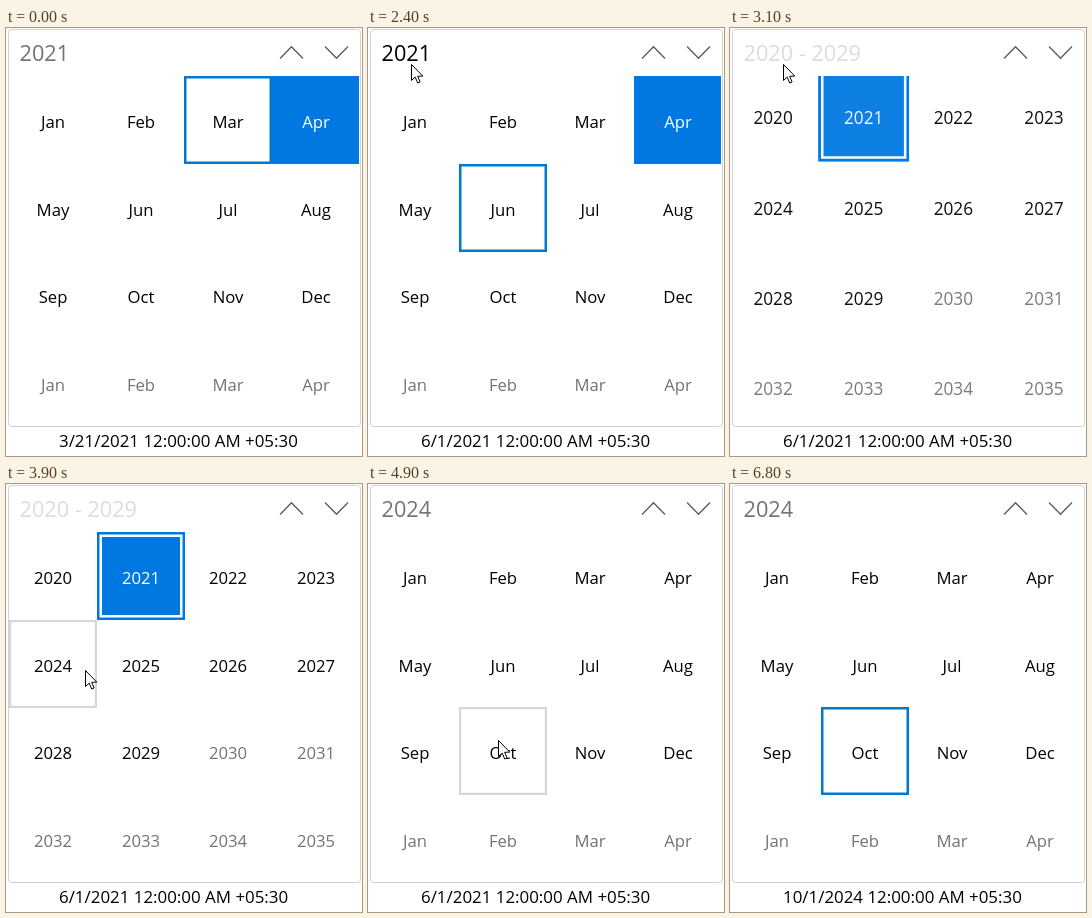
An HTML page with a canvas that plays this animation: 356 px wide and 428 px high, repeating every 6900 ms.

```html
<!DOCTYPE html>
<html lang="en">
<head>
<meta charset="utf-8">
<title>Calendar picker</title>
<style>
  html, body { margin: 0; width: 100%; height: 100%; overflow: hidden; background: #fff; }
  canvas { display: block; }
</style>
</head>
<body>
<canvas id="stage" width="356" height="428"></canvas>
<script>
const ctx = document.getElementById("stage").getContext("2d");
const LOOP = 6900, STEP = 100, CELL = 87.5, LEFT = 3, TOP = 48;
const BLUE = "#0078e2", EDGE = "#0078d0", GRAY = "#737373";
const FONT = '"Open Sans", "Noto Sans", sans-serif';
const MONTHS = "Jan Feb Mar Apr May Jun Jul Aug Sep Oct Nov Dec Jan Feb Mar Apr".split(" ");
const YEARS = Array.from({ length: 16 }, (_, i) => String(2020 + i));

// Pointer path: time, x, y
const PATH = [
  [600, 225, 210], [1100, 149, 177], [1500, 149, 177], [1800, 115, 112],
  [2100, 62, 76], [2300, 44, 40], [2400, 43, 36], [2900, 43, 36],
  [3100, 53, 36], [3300, 53, 36], [3800, 79, 186], [4300, 79, 186],
  [4800, 130, 256], [5800, 130, 256], [6500, 170, 400]
];

const clamp = v => Math.max(0, Math.min(1, v));

function pointer(t) {
  const i = PATH.findIndex(k => k[0] > t);
  if (i < 1) return null;
  const [t0, x0, y0] = PATH[i - 1], [t1, x1, y1] = PATH[i];
  const p = (t - t0) / (t1 - t0), e = p * p * (3 - 2 * p);
  return { x: x0 + (x1 - x0) * e, y: y0 + (y1 - y0) * e };
}

function cellAt(pos) {
  if (!pos) return -1;
  const c = Math.floor((pos.x - LEFT) / CELL), r = Math.floor((pos.y - TOP) / CELL);
  return c >= 0 && c < 4 && r >= 0 && r < 4 ? r * 4 + c : -1;
}

function text(s, x, y, size, color, align = "left") {
  ctx.font = `${size}px ${FONT}`;
  ctx.fillStyle = color;
  ctx.textAlign = align;
  ctx.fillText(s, x, y);
}

function line(points, color, width) {
  ctx.beginPath();
  points.forEach(p => ctx.lineTo(...p));
  ctx.strokeStyle = color;
  ctx.lineWidth = width;
  ctx.stroke();
}

function box(x, y, inset, color, width) {
  const d = inset + width / 2, size = 88 - 2 * d;
  ctx.strokeStyle = color;
  ctx.lineWidth = width;
  ctx.strokeRect(x + d, y + d, size, size);
}

// view: labels, count of active cells, today's cell, selected cell
function grid(view, hover, scale = 1, alpha = 1) {
  if (alpha <= 0) return;
  ctx.save();
  ctx.beginPath();
  ctx.rect(LEFT, TOP, 350, 350);
  ctx.clip();
  ctx.globalAlpha = alpha;
  ctx.translate(178, 223);
  ctx.scale(scale, scale);
  ctx.translate(-178, -223);
  view.labels.forEach((label, i) => {
    const x = Math.round(LEFT + i % 4 * CELL);
    const y = Math.round(TOP + Math.floor(i / 4) * CELL);
    const today = i === view.today, selected = i === view.selected;
    if (today) {
      ctx.fillStyle = BLUE;
      ctx.fillRect(x, y, 88, 88);
    }
    if (selected) {
      box(x, y, 0, today ? BLUE : EDGE, 2.5);
      if (today) box(x, y, 2.5, "#fff", 2.5);
    } else if (i === hover) {
      box(x, y, 0, "#d6d6d6", 2.2);
    }
    text(label, x + 44, y + 52, 16.7, today ? "#fff" : i < view.active ? "#000" : GRAY, "center");
  });
  ctx.restore();
}

function zoom(p, from, to, hover, fromEnd, toStart) {
  const ease = 1 - (1 - p) ** 2.4;
  grid(from, hover, 1 + (fromEnd - 1) * ease, 1 - p / 0.4);
  grid(to, hover, toStart + (1 - toStart) * ease, clamp((p - 0.5) / 0.265));
}

function arrow({ x, y }) {
  ctx.save();
  ctx.translate(x + 0.5, y + 0.5);
  ctx.beginPath();
  [[0, 0], [0, 16], [3.7, 12.6], [6.2, 18.5], [8.6, 17.5], [6.2, 11.8], [11.3, 11.6]]
    .forEach(p => ctx.lineTo(...p));
  ctx.closePath();
  ctx.fillStyle = "#fff";
  ctx.fill();
  ctx.strokeStyle = "#000";
  ctx.lineWidth = 1;
  ctx.stroke();
  ctx.restore();
}

function draw(t) {
  const pos = pointer(t), hover = cellAt(pos);
  const months = (today, selected) => ({ labels: MONTHS, active: 12, today, selected });
  const before = months(3, t < 1300 ? 2 : 5);
  const after = months(-1, t < 5200 ? -1 : 9);
  const years = { labels: YEARS, active: 10, today: 1, selected: 1 };

  ctx.fillStyle = "#fff";
  ctx.fillRect(0, 0, 356, 428);
  ctx.beginPath();
  ctx.roundRect(2.5, 1.5, 352, 397, 3);
  ctx.strokeStyle = "#d2d2d2";
  ctx.lineWidth = 1;
  ctx.stroke();

  const decade = t >= 2600 && t < 4100;
  const title = decade ? "2020 - 2029" : t < 2600 ? "2021" : "2024";
  const onTitle = pos && pos.y < TOP;
  text(title, 13.5, 33, 21.7, decade ? "#dcdcdc" : onTitle ? "#000" : GRAY);
  line([[274, 30.5], [285.5, 18.7], [297, 30.5]], "#5a5a5a", 1.3);
  line([[319, 18.5], [330.5, 30.3], [342, 18.5]], "#5a5a5a", 1.3);

  if (t < 2600) grid(before, hover);
  else if (t < 3300) zoom((t - 2500) / 800, before, years, hover, 0.84, 1.84);
  else if (t < 4100) grid(years, hover);
  else if (t < 4900) zoom((t - 4000) / 900, years, after, hover, 1.2, 0.84);
  else grid(after, hover);

  const date = t < 1300 ? "3/21/2021" : t < 5200 ? "6/1/2021" : "10/1/2024";
  text(date + " 12:00:00 AM +05:30", 53, 419, 16.9, "#000");
  if (pos) arrow(pos);
}

const start = performance.now();
function frame() {
  const t = (performance.now() - start) % LOOP;
  draw(Math.floor(t / STEP) * STEP);
  requestAnimationFrame(frame);
}
frame();
</script>
</body>
</html>
```
